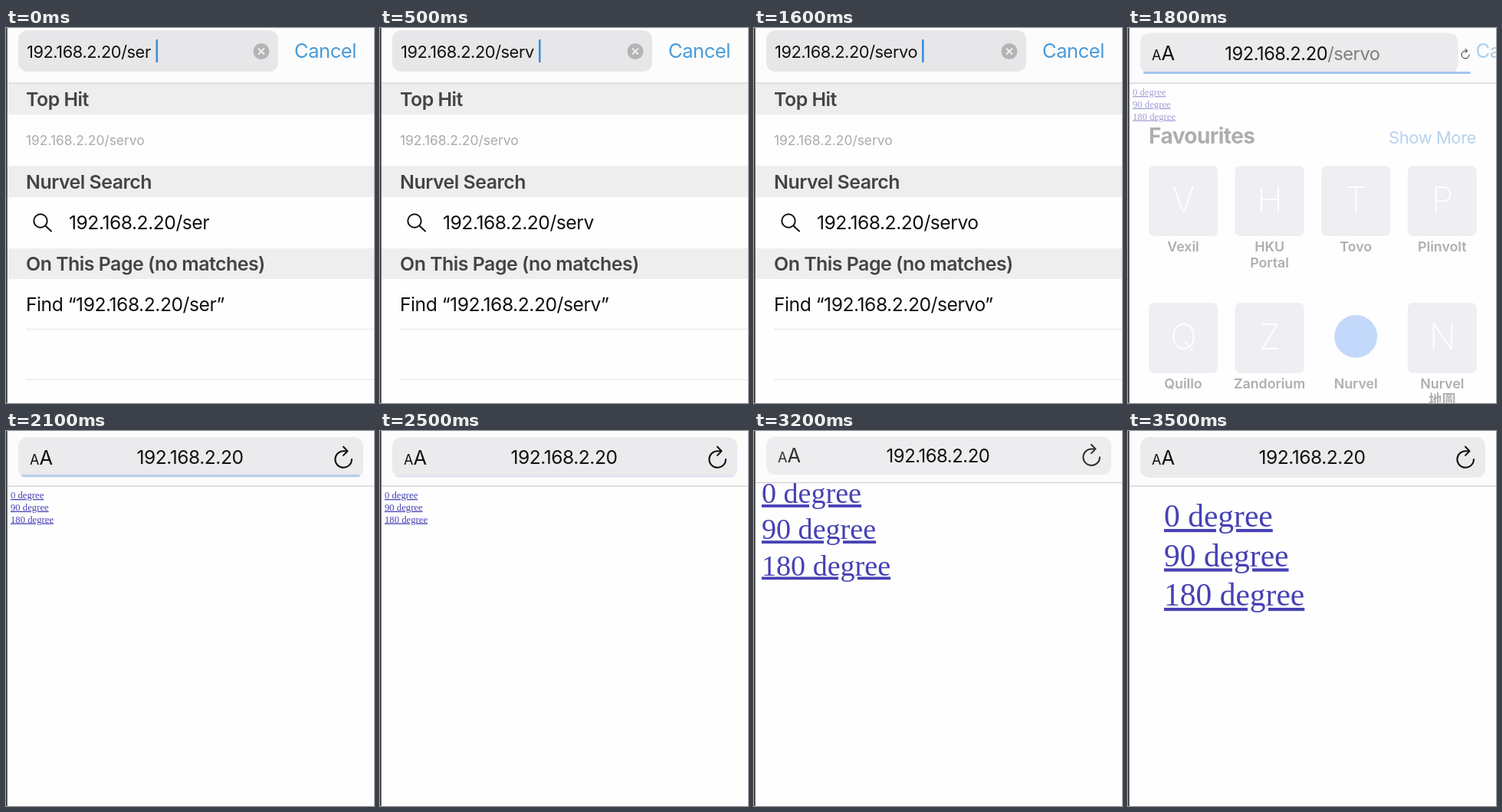
An HTML page for the animation above (3.6 s loop, 480 px wide and 490 px high).

```html
<!DOCTYPE html>
<html lang="en">
<head>
<meta charset="utf-8">
<title>Typing an address and zooming the page</title>
<style>
html, body { margin: 0; width: 100%; height: 100%; overflow: hidden; background: #fefefe; }
svg { display: block; width: 100%; height: 100%; }
text { font-family: Inter, "Noto Sans CJK TC", "Noto Sans CJK", sans-serif; letter-spacing: -.02em; white-space: pre; }
.head { font-size: 24.9px; font-weight: 600; fill: #444; }
.item { font-size: 24.7px; fill: #111; }
.blue { fill: #4a9bd9; }
.mid { text-anchor: middle; }
.label { font-size: 17.8px; font-weight: 600; letter-spacing: 0; }
.letter { font-size: 46px; font-weight: 200; fill: #fff; }
.stroke { fill: none; stroke: #111; stroke-width: 2; stroke-linecap: round; stroke-linejoin: round; }
#page text { font: 12.7px "Liberation Serif", Times, serif; letter-spacing: 0; fill: #4641b4; text-decoration: underline; }
</style>
</head>
<body>
<svg viewBox="0 0 480 490">
  <rect width="480" height="490" fill="#fefefe"/>
  <g id="page">
    <text>0 degree</text>
    <text y="15.75">90 degree</text>
    <text y="31.5">180 degree</text>
  </g>
  <g id="favs">
    <text x="27" y="151" font-size="28" font-weight="700">Favourites</text>
    <text x="454" y="151" font-size="22" text-anchor="end" fill="#1a6fd4">Show More</text>
  </g>
  <rect id="header" width="480" fill="#fcfcfc"/>
  <rect id="rule" width="480" height="1.2" fill="#cfcfcf"/>
  <g id="list">
    <path d="M0 73H480V113H0ZM0 180H480V221H0ZM0 288H480V328H0Z" fill="#eeeeee"/>
    <path d="M26 393.5H480M26 459.5H480" stroke="#e4e4e4"/>
    <text class="head" x="26" y="102">Top Hit</text>
    <text x="26" y="153" font-size="17.4" fill="#aaa" style="letter-spacing:0">192.168.2.20/servo</text>
    <text class="head" x="26" y="210">Nurvel Search</text>
    <path class="stroke" d="M51.5 258.500L59 265.500"/>
    <circle class="stroke" cx="45" cy="252" r="8.7"/>
    <text class="item" id="query" x="82" y="263"/>
    <text class="head" x="26" y="317">On This Page (no matches)</text>
    <text class="item" id="find" x="26" y="370"/>
  </g>
  <rect id="bar" x="16" rx="12"/>
  <rect id="progress" x="20" y="57" height="3" rx="1.5" fill="#a4c4ee"/>
  <text id="cancel" class="blue" y="39" font-size="25.6">Cancel</text>
  <g id="edit">
    <circle cx="333" cy="30.500" r="10.5" fill="#b4b4b6"/>
    <path d="M329 26.500l8 8m0-8l-8 8" stroke="#f0f0f0" stroke-width="1.8"/>
    <rect id="cursor" y="15" width="2.6" height="30" fill="#3f8fd8"/>
  </g>
  <g id="tools">
    <text x="31" y="44" font-size="18" fill="#111">A</text>
    <text x="43.500" y="44" font-size="25.500" fill="#111">A</text>
    <path id="reload" class="stroke" d="M451 37A10.8 10.8 0 1 1 440 26.200h5M440 20.500l5.500 5.700-5.500 5.700"/>
  </g>
  <g id="title">
    <text id="address" fill="#111"><tspan id="host">192.168.2.20</tspan><tspan id="path"/></text>
  </g>
  <rect width="1.7" height="490" fill="#38383a"/>
</svg>
<script>
const LOOP = 3600, STEP = 100;
const $ = id => document.getElementById(id);
const set = (id, attrs) => {
  for (const name in attrs) $(id).setAttribute(name, attrs[name]);
};
const mix = (a, b, u) => a + (b - a) * u;

// Linear interpolation through [time, value] points.
const key = (t, ...points) => {
  const i = points.findIndex(p => p[0] > t);
  if (i < 0) return points.at(-1)[1];
  if (!i) return points[0][1];
  const [a, v] = points[i - 1], [b, w] = points[i];
  return mix(v, w, (t - a) / (b - a));
};

const sites = ["Vexil", "HKU Portal", "Tovo", "Plinvolt", "Quillo", "Zandorium", "Nurvel", "Nurvel 地圖"];
$("favs").innerHTML += sites.map((name, i) => {
  const x = 72 + i % 4 * 112.6, y = i < 4 ? 180 : 359;
  const icon = i === 6
    ? `<circle cx="${x}" cy="${y + 44}" r="28" fill="#4285f4"/>`
    : `<rect x="${x - 45}" y="${y}" width="90" height="92" rx="7" fill="#cdcbdd"/>
       <text class="letter mid" x="${x}" y="${y + 61}">${name[0]}</text>`;
  const lines = name.split(" ").map((word, n) =>
    `<text class="label mid" x="${x}" y="${y + 112 + n * 21}">${word}</text>`);
  return icon + lines.join("");
}).join("");

function draw(t) {
  const typed = t < 500 ? 0 : t < 700 ? 1 : 2;
  const path = "/" + ["ser", "serv", "servo"][typed];
  const load = key(t, [1600, 0], [1700, .3], [1800, .68], [1900, .9], [2000, 1]);
  const fold = key(t, [2600, 0], [2700, .4], [2800, .9], [2900, 1], [3000, .9], [3100, .5], [3200, .1], [3300, 0]);
  const editing = load ? "none" : "inline";

  $("query").textContent = "192.168.2.20" + path;
  $("find").textContent = `Find “192.168.2.20${path}”`;
  $("path").textContent = path;
  set("list", { display: editing });
  set("edit", { display: editing });
  set("cursor", { x: [195.5, 207, 219][typed] });
  set("cancel", { x: mix(376, 490, load), opacity: 1 - .8 * load });

  const zoom = key(t, [2600, 1], [2700, 1.3], [2800, 1.9], [2900, 2.38], [3200, 3], [3300, 3.15], [3400, 3.25], [3500, 3.27]);
  const x = key(t, [2600, 6], [2700, -4], [2800, -24], [2900, -42], [3000, -38], [3100, -20], [3200, 10], [3300, 32], [3400, 44], [3500, 47]);
  const y = key(t, [2600, 88], [2700, 80], [2800, 66], [2900, 54], [3000, 58], [3100, 74], [3200, 94], [3300, 113], [3400, 122], [3500, 125]);
  set("page", {
    transform: `translate(${x} ${y}) scale(${zoom})`,
    opacity: key(t, [1600, 0], [1700, .15], [1800, .5], [1900, .8], [2000, 1])
  });
  set("favs", {
    display: load ? "inline" : "none",
    opacity: key(t, [1700, .65], [1800, .31], [1900, .14], [2000, .05], [2100, 0])
  });

  const headerH = mix(71.5, 25.5, fold), tools = Math.max(0, 1 - 1.5 * fold);
  set("header", { height: headerH });
  set("rule", { y: headerH });
  set("bar", {
    y: mix(3, 8, load) * (1 - fold),
    width: mix(339, 450, load),
    height: mix(54, 53, load) * (1 - .55 * fold),
    fill: load ? "#ebeaed" : "#e7e7e9",
    opacity: tools
  });
  set("progress", {
    width: key(t, [1600, 0], [1700, 220], [1800, 427], [1900, 442]),
    opacity: key(t, [1800, 1], [2100, .7], [2400, .25], [2500, .15], [2600, 0])
  });
  set("tools", {
    display: load ? "inline" : "none",
    opacity: tools,
    transform: `translate(0 ${mix(-5, 0, load) - 28 * fold})`
  });
  set("reload", { transform: `translate(440 36) scale(${load * load}) translate(-440 -36)` });

  set("address", { "font-size": mix(21.8, 24.6, load) });
  const hostWidth = $("host").getComputedTextLength();
  set("address", { x: mix(27, 240 - hostWidth / 2, load) });
  set("path", {
    display: t < 2100 ? "inline" : "none",
    opacity: 1,
    "fill-opacity": key(t, [1600, 1], [1800, .5], [1900, .3], [2100, 0])
  });
  const baseline = mix(mix(38.5, 43.3, load), 18, fold);
  set("title", { transform: `translate(240 ${baseline}) scale(${mix(1, .7, fold)}) translate(-240 0)` });
}

function tick() {
  draw(Math.floor(performance.now() % LOOP / STEP) * STEP);
  requestAnimationFrame(tick);
}
tick();
</script>
</body>
</html>
```
